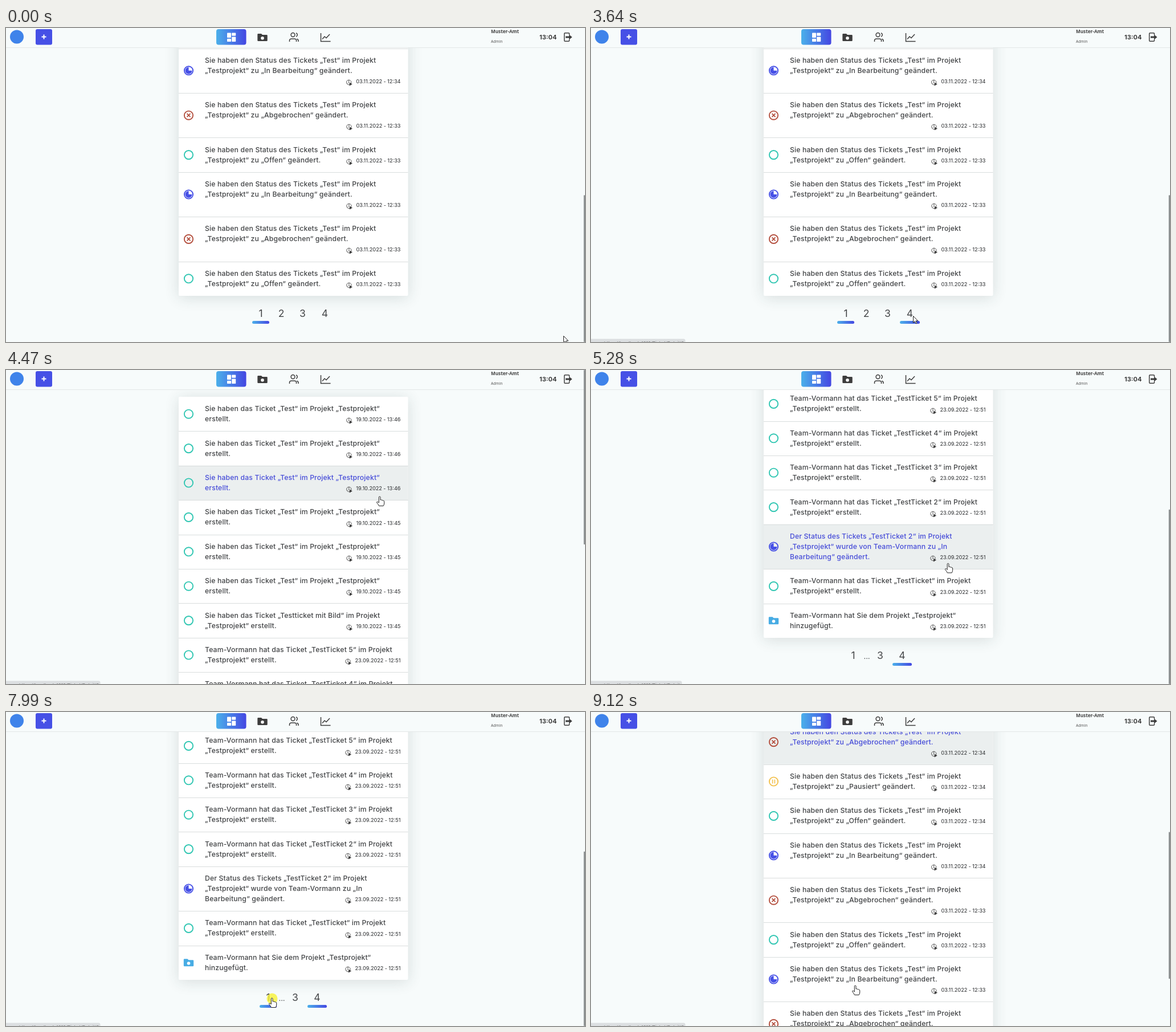
An HTML page with a canvas for the animation above (9.2 s loop, 1016 px wide and 551 px high).

```html
<!DOCTYPE html>
<html lang="de">
<head>
<meta charset="utf-8">
<style>
html, body { margin: 0; width: 100%; height: 100%; overflow: hidden; background: #f7fbfb; }
canvas { display: block; }
</style>
</head>
<body>
<canvas id="stage" width="1016" height="551"></canvas>
<script>
const ctx = document.getElementById('stage').getContext('2d');
const W = 1016, H = 551, LOOP = 9200;
const LEFT = 303, RIGHT = 705.5, TOP = 47, HEADER = 34;
const BLUE = '#4650e6', DARK = '#3d3d3d', SANS = 'Inter, sans-serif';
const OPEN_4 = 3700, OPEN_1 = 8060;

// Rows: icon kind, text lines, date, and whether the date needs its own line
const STATUS = { O: 'Offen', I: 'In Bearbeitung', A: 'Abgebrochen', P: 'Pausiert' };
const LEADER = 'Team-Vormann';
const row = (kind, lines, date, tall) => ({ kind, lines, date, height: tall ? 78.4 : 60.4 });

const firstRows = [...'OIAPOIAPOIAOIAO'].map((kind, i) => row(kind,
  ['Sie haben den Status des Tickets „Test“ im Projekt', `„Testprojekt“ zu „${STATUS[kind]}“ geändert.`],
  `03.11.2022 - 12:3${i < 10 ? 4 : 3}`, 'IA'.includes(kind)));

const AUTUMN = '23.09.2022 - 12:51';
const byLeader = name => row('O', [`${LEADER} hat das Ticket „${name}“ im Projekt`, '„Testprojekt“ erstellt.'], AUTUMN);
const lastRows = [
  ...Array.from({ length: 6 }, (_, i) => row('O',
    ['Sie haben das Ticket „Test“ im Projekt „Testprojekt“', 'erstellt.'], `19.10.2022 - 13:4${i < 3 ? 6 : 5}`)),
  row('O', ['Sie haben das Ticket „Testticket mit Bild“ im Projekt', '„Testprojekt“ erstellt.'], '19.10.2022 - 13:45'),
  ...[5, 4, 3, 2].map(n => byLeader('TestTicket ' + n)),
  row('I', ['Der Status des Tickets „TestTicket 2“ im Projekt',
    `„Testprojekt“ wurde von ${LEADER} zu „In`, 'Bearbeitung“ geändert.'], AUTUMN, true),
  byLeader('TestTicket'),
  row('F', [`${LEADER} hat Sie dem Projekt „Testprojekt“`, 'hinzugefügt.'], AUTUMN),
];

function makePage(id, rows, links, active) {
  let y = TOP;
  for (const r of rows) { r.top = y; y += r.height; }
  return { id, rows, links, active, bottom: y, maxScroll: y - 470 };
}
// Links: label, centre, underline width
const pageOne = makePage('p1', firstRows, [['1', 447, 30], ['2', 483, 33], ['3', 520.5, 33], ['4', 559.5, 35]], '1');
const pageFour = makePage('p4', lastRows, [['1', 460, 30], ['...', 484, 0], ['3', 507.5, 33], ['4', 546, 34]], '4');

// Pointer path: time, x, y of the tip
const PATH = [
  [70, 978, 540], [450, 865, 350], [680, 806, 323], [930, 777, 430], [1000, 770, 436], [1200, 640, 450],
  [1420, 440, 469], [1460, 405, 474], [1600, 398, 486], [1920, 437, 502], [2100, 450, 507], [2400, 483, 508],
  [2650, 520, 508], [2900, 541, 509], [3600, 565, 505], [3900, 565, 505], [4350, 656, 222], [5070, 656, 222],
  [5280, 627, 339], [5500, 600, 430], [5700, 577, 473], [5970, 528, 503], [6300, 510, 508], [6700, 490, 507],
  [6930, 472, 503], [7000, 467, 502], [8390, 467, 502], [8600, 464, 480],
];
const HAND_TIMES = [[1060, 1430], [2020, 2900], [3760, 5680], [6150, 6600], [7000, LOOP]];

const within = (t, [a, b]) => t >= a && t < b;
const progress = (t, a, b) => Math.min(1, Math.max(0, (t - a) / (b - a)));

function pointer(t) {
  const i = PATH.findIndex(p => p[0] > t);
  if (i === 0) return PATH[0].slice(1);
  if (i < 0) return PATH[PATH.length - 1].slice(1);
  const [a, b] = [PATH[i - 1], PATH[i]], k = progress(t, a[0], b[0]);
  return [a[1] + (b[1] - a[1]) * k, a[2] + (b[2] - a[2]) * k];
}

const pageAt = t => within(t, [OPEN_4, OPEN_1]) ? pageFour : pageOne;

function scrollAt(t) {
  if (t < OPEN_4) return pageOne.maxScroll;
  if (t < OPEN_1) {
    const k = progress(t, 4540, 4750);
    return pageFour.maxScroll * k * (2 - k);
  }
  return 450 * progress(t, 8600, 9120);
}

// Hover is not refreshed while the list scrolls
function hoverKey(t) {
  const page = pageAt(t), [x, y] = pointer(t);
  const frozen = within(t, [OPEN_4, 4750]) || t >= OPEN_1;
  const docY = y + (frozen ? 0 : scrollAt(t));
  if (docY > page.bottom + 18) {
    const link = page.links.find(l => Math.abs(x - l[1]) <= l[2] / 2);
    return link && page.id + 'link' + link[0];
  }
  const index = page.rows.findIndex(r => docY >= r.top && docY < r.top + r.height);
  return x > LEFT && x < RIGHT && index >= 0 ? page.id + 'row' + index : null;
}

// Linear transitions: share of the recent past spent hovering each item
function hoverLevels(t, span = 120, steps = 12) {
  const levels = {};
  for (let i = 0; i < steps; i++) {
    const key = hoverKey(Math.max(0, t - span * i / steps));
    if (key) levels[key] = (levels[key] || 0) + 1 / steps;
  }
  return levels;
}

function text(str, x, y, size, color, { weight = 400, align = 'left', spacing = 0, family = SANS } = {}) {
  ctx.font = `${weight} ${size}px ${family}`;
  ctx.letterSpacing = spacing + 'px';
  ctx.textAlign = align;
  ctx.fillStyle = color;
  ctx.fillText(str, x, y);
}
function box(x, y, w, h, r, color) {
  ctx.fillStyle = color;
  ctx.beginPath();
  ctx.roundRect(x, y, w, h, r);
  ctx.fill();
}
function disc(x, y, r, color) {
  ctx.fillStyle = color;
  ctx.beginPath();
  ctx.arc(x, y, r, 0, 7);
  ctx.fill();
}
function ring(x, y, r, color, width) {
  ctx.strokeStyle = color;
  ctx.lineWidth = width;
  ctx.beginPath();
  ctx.arc(x, y, r, 0, 7);
  ctx.stroke();
}
function shape(x, y, path, { fill, stroke, width = 1.5 }) {
  const p = new Path2D(path);
  ctx.save();
  ctx.translate(x, y);
  if (fill) { ctx.fillStyle = fill; ctx.fill(p); }
  if (stroke) { ctx.strokeStyle = stroke; ctx.lineWidth = width; ctx.stroke(p); }
  ctx.restore();
}
function sweep(x, w) {
  const g = ctx.createLinearGradient(x, 0, x + w, 0);
  g.addColorStop(0, '#4bb0ea');
  g.addColorStop(1, '#4448e2');
  return g;
}
function folder(x, y, color) {
  shape(x, y, 'M-7.5-6.5H-2L0-4.5H7.5Q8.7-4.5 8.7-3.3V5.3Q8.7 6.5 7.5 6.5H-7.5Q-8.7 6.5-8.7 5.3V-5.3Q-8.7-6.5-7.5-6.5Z', { fill: color });
  disc(x, y + 1.2, 2.8, '#fff');
}

function statusIcon(kind, y) {
  const x = 320.5;
  if (kind === 'F') return folder(x, y, '#47ace4');
  const color = { O: '#30c6b2', I: BLUE, A: '#b4503f', P: '#f2c14e' }[kind];
  ring(x, y, 7.6, color, 1.9);
  if (kind === 'I') shape(x, y, 'M0 0V-6A6 6 0 1 0 6 0Z', { fill: color });
  if (kind === 'A') shape(x, y, 'M-3-3L3 3M3-3L-3 3', { stroke: color, width: 1.8 });
  if (kind === 'P') shape(x, y, 'M-1.9-3.4V3.4M1.9-3.4V3.4', { stroke: color, width: 1.6 });
}

function drawRow(r, y, hovered, level) {
  if (hovered) {
    box(LEFT, y, RIGHT - LEFT, r.height, 0, '#ebefef');
    ctx.fillStyle = '#cdd3d3';
    ctx.fillRect(LEFT, Math.round(y + r.height), RIGHT - LEFT, 1);
  }
  const mix = (a, b) => Math.round(a + (b - a) * level);
  const color = `rgb(${mix(66, 70)},${mix(68, 76)},${mix(70, 216)})`;
  r.lines.forEach((line, i) =>
    text(line, 349, Math.round(y + 25.2 + 18 * i), 12.2, color, { weight: 500, spacing: 0.16 }));
  const dateY = Math.round(y + r.height - 17.1);
  text(r.date, 692.5, dateY, 9, '#444648', { align: 'right', weight: 500 });
  const x = 692.5 - ctx.measureText(r.date).width - 12.5;
  ring(x, dateY - 1.6, 4.2, '#555', 1);
  shape(x, dateY - 1.6, 'M0-4V0L-2 2', { stroke: '#555', width: 1 });
  shape(x, dateY - 1.6, 'M1 0L6 3L1 6Z', { fill: DARK });
  statusIcon(r.kind, y + r.height / 2);
}

function drawPage(page, scroll, t) {
  const levels = hoverLevels(t), current = hoverKey(t);
  ctx.save();
  ctx.shadowColor = 'rgba(40,60,60,.16)';
  ctx.shadowBlur = 26;
  ctx.shadowOffsetY = 3;
  box(LEFT, TOP - scroll, RIGHT - LEFT, page.bottom - TOP, 2, '#fff');
  ctx.restore();
  page.rows.forEach((r, i) => {
    const y = r.top - scroll, key = page.id + 'row' + i;
    if (y > H || y + r.height < 0) return;
    drawRow(r, y, key === current, levels[key] || 0);
    ctx.fillStyle = '#d9dddd';
    if (i) ctx.fillRect(LEFT, Math.round(y), RIGHT - LEFT, 1);
  });
  const base = page.bottom - scroll;
  for (const [label, x, width] of page.links) {
    text(label, x, base + 37.3, label === '...' ? 13 : 17.5, '#444648', { align: 'center' });
    const w = width * (label === page.active ? 1 : levels[page.id + 'link' + label] || 0);
    if (w) box(x - w / 2, base + 44, w, 5, 2.5, sweep(x - w / 2, w));
  }
}

function drawHeader() {
  box(0, 0, W, HEADER, 0, '#f7fbfb');
  ctx.fillStyle = '#e3e7e7';
  ctx.fillRect(0, HEADER, W, 1);
  disc(19, 15.5, 12, '#3f83ea');
  box(52, 2, 29, 27.5, 3, BLUE);
  shape(66.5, 15.5, 'M-4 0H4M0-4V4', { stroke: '#fff', width: 2 });
  box(369, 2, 52.5, 27.5, 4, sweep(369, 52));
  for (const [x, y, h] of [[388, 8.5, 8.5], [388, 18.7, 5.3], [396.2, 8.5, 5.3], [396.2, 15.5, 8.5]]) box(x, y, 7, h, 0.8, '#fff');
  folder(450, 16.5, DARK);
  ring(503.5, 12, 3.4, DARK, 1.5);
  shape(505, 16, 'M-7.5 8V6Q-7.5 3-4 3H1Q4.5 3 4.5 6V8M4-7.2A3.4 3.4 0 0 1 4-.8M5.5 3.2Q8 4 8 6.5V8', { stroke: DARK });
  shape(552.5, 9, 'M0 0V14.5H17M2.5 10.5L6.5 6L9.5 8.5L15.5 2', { stroke: DARK });
  const noto = '"Noto Sans", sans-serif';
  text('Muster-Amt', 851, 9, 8.2, '#444', { weight: 700, family: noto });
  text('Admin', 851, 25.5, 6.6, '#555', { family: noto });
  text('13:04', 936, 20, 11, DARK, { weight: 700 });
  shape(979, 8, 'M9.5 4V2Q9.5 .7 8 .7H2Q.7 .7 .7 2V14Q.7 15.3 2 15.3H8Q9.5 15.3 9.5 14V12', { stroke: DARK });
  shape(982, 16, 'M0-1.6H6V-4.6L11.5 0L6 4.6V1.6H0Z', { fill: DARK });
}

function drawLinkHint(t) {
  if (t < 2050 || within(t, [6100, 6400])) return;
  const short = within(t, [5100, 6100]);
  box(-4, 545.5, short ? 163.5 : 169.5, 10, 3, '#dcdfe1');
  text('https://localhost:4316/Ticket/Detail' + (short ? '' : '/0'), 23, 556, 8, '#666');
}

function drawPointer(t) {
  const [x, y] = pointer(t), style = { fill: '#fff', stroke: '#222', width: 1 };
  if (HAND_TIMES.some(span => within(t, span)))
    shape(x, y, 'M-1.7 9V1.3Q-1.7 0-.4 0Q1 0 1 1.3V6Q3.2 5.2 3.7 6.6Q5.7 6 6.1 7.4Q7.7 7.2 7.7 8.8V12Q7.7 14 6.2 16.5H-1.6Q-2.5 14-5 11.2Q-6 9.5-4.6 9Q-3.3 8.8-1.7 11Z', style);
  else
    shape(x + 0.5, y + 0.5, 'M0 0V11.6L2.7 9.2L4.6 13.4L6.5 12.5L4.6 8.4H8.2Z', style);
}

function draw(t) {
  const page = pageAt(t), scroll = scrollAt(t);
  box(0, 0, W, H, 0, '#f7fbfb');
  drawPage(page, scroll, t);
  drawHeader();
  const scale = H / (H + page.maxScroll);
  box(1013.8, scroll * scale, 2.2, H * scale, 1, '#8b8f90');
  drawLinkHint(t);
  if (within(t, [7990, OPEN_1])) disc(467, 503, 9.5, 'rgba(248,242,50,.78)');
  drawPointer(t);
}

function tick(now) {
  draw(now % LOOP);
  requestAnimationFrame(tick);
}
requestAnimationFrame(tick);
</script>
</body>
</html>
```
